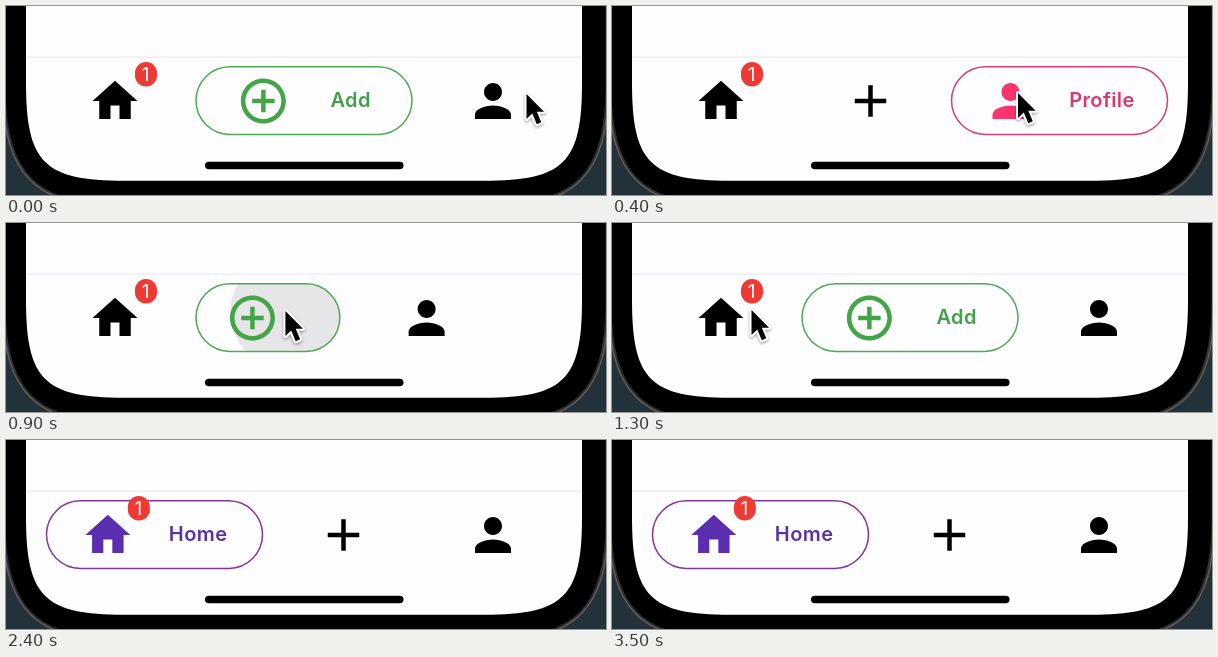
Animation of 600x189 px, one loop 3600 ms. Source, as an HTML page with a canvas:

```html
<!DOCTYPE html>
<html lang="en">
<head>
<meta charset="utf-8">
<title>Navigation bar</title>
<style>
  html, body { margin: 0; width: 100%; height: 100%; overflow: hidden; background: #000; }
  canvas { display: block; width: 600px; height: 189px; }
</style>
</head>
<body>
<canvas id="stage" width="600" height="189"></canvas>
<script>
const ctx = document.getElementById('stage').getContext('2d');
const LOOP = 3600, STEP = 100, SLIDE = 380;
const NARROW = 138, WIDE = 217, GAP = 11.5, LEFT = 40, ICON = 54;
const MID = 95;

const icons = {
  home: new Path2D('M10 20v-6h4v6h5v-8h3L12 3 2 12h3v8z'),
  plus: new Path2D('M19 13h-6v6h-2v-6H5v-2h6V5h2v6h6v2z'),
  ring: new Path2D('M13 7h-2v4H7v2h4v4h2v-4h4v-2h-4V7zm-1-5C6.48 2 2 6.48 2 12s4.48 10 10 10 10-4.48 10-10S17.52 2 12 2zm0 18c-4.41 0-8-3.59-8-8s3.59-8 8-8 8 3.59 8 8-3.59 8-8 8z'),
  person: new Path2D('M12 12c2.21 0 4-1.79 4-4s-1.79-4-4-4-4 1.79-4 4 1.79 4 4 4zm0 2c-2.67 0-8 1.34-8 4v2h16v-2c0-2.66-5.33-4-8-4z')
};
const arrow = new Path2D('M0 0V25L5.8 19.6L10.3 30.2L14.8 28.3L10.3 17.8H17.6Z');

// lag: how far a closing item's icon trails its centre
const items = [
  { label: 'Home', on: 'home', off: 'home', lag: 25, fill: '#5b2eb0', text: '#5932a3', edge: '#86369a' },
  { label: 'Add', on: 'ring', off: 'plus', lag: 24.4, fill: '#43a548', text: '#43a047', edge: '#4caa50' },
  { label: 'Profile', on: 'person', off: 'person', lag: 42, fill: '#fb346f', text: '#d8386f', edge: '#d43f78' }
];

const taps = [
  { at: 15, from: 1, to: 2 },
  { at: 794, from: 2, to: 1 },
  { at: 1730, from: 1, to: 0 }
];

// time, x, y of the pointer tip
const route = [
  [0, 520.5, 88], [100, 497, 88], [200, 480, 88], [400, 406, 87],
  [740, 281, 88], [940, 279, 88], [1300, 139.5, 87], [1750, 134, 86],
  [2050, 134, 86], [2300, 118, 200]
];

const clamp = v => Math.max(0, Math.min(1, v));
const mix = (a, b, k) => a + (b - a) * k;
const ease = x => x < 0.5 ? 4 * x ** 3 : 1 - 4 * (1 - x) ** 3;

function pointer(t) {
  const i = route.findIndex(p => p[0] > t);
  if (i < 0) return null;
  const [t0, x0, y0] = route[i - 1], [t1, x1, y1] = route[i];
  const k = (t - t0) / (t1 - t0);
  return { x: mix(x0, x1, k), y: mix(y0, y1, k) };
}

function box(x, y, w, h, r) {
  ctx.beginPath();
  ctx.roundRect(x, y, w, h, r);
}

// Open-topped body with smooth lower corners of size s; c sets their fullness
function body(l, r, b, s, c) {
  ctx.beginPath();
  ctx.moveTo(l, -20);
  ctx.lineTo(l, b - s);
  ctx.bezierCurveTo(l, b - c, l + c, b, l + s, b);
  ctx.lineTo(r - s, b);
  ctx.bezierCurveTo(r - c, b, r, b - c, r, b - s);
  ctx.lineTo(r, -20);
  ctx.closePath();
}

function drawPhone() {
  ctx.fillStyle = '#22323a';
  ctx.fillRect(0, 0, 600, 189);
  body(-3, 602, 201, 120, 32);
  ctx.fillStyle = '#000';
  ctx.fill();
  ctx.strokeStyle = '#2c2e31';
  ctx.lineWidth = 5;
  ctx.stroke();
  ctx.strokeStyle = '#5c5e62';
  ctx.lineWidth = 1.5;
  ctx.stroke();
  body(20, 576, 174.8, 98, 18);
  ctx.fillStyle = '#fefdff';
  ctx.fill();
  ctx.fillStyle = '#ededf0';
  ctx.fillRect(20, 50.5, 556, 1.3);
  box(199, 155.8, 198.5, 7.5, 3.75);
  ctx.fillStyle = '#000';
  ctx.fill();
}

function drawIcon(name, x, color) {
  ctx.save();
  ctx.translate(x - 27, MID - 27);
  ctx.scale(2.25, 2.25);
  ctx.fillStyle = color;
  ctx.fill(icons[name]);
  ctx.restore();
}

function drawBadge(x) {
  box(x - 11, 56, 22, 24.5, 11);
  ctx.fillStyle = '#ee3a32';
  ctx.fill();
  ctx.fillStyle = '#fff';
  ctx.font = '19px Inter, sans-serif';
  ctx.letterSpacing = '0px';
  ctx.textAlign = 'center';
  ctx.fillText('1', x - 0.5, 75);
}

function drawRipple(tap, age) {
  const alpha = 0.095 * clamp((330 - age) / 190);
  if (!alpha) return;
  const p = pointer(tap.at);
  ctx.save();
  ctx.clip();
  ctx.beginPath();
  ctx.arc(p.x, p.y + 1, Math.min(230, 0.005 * age * age), 0, 7);
  ctx.fillStyle = `rgba(0,0,0,${alpha})`;
  ctx.fill();
  ctx.restore();
}

function drawActive(item, x, w, e, k, tap, age) {
  ctx.font = '600 20px Inter, sans-serif';
  ctx.letterSpacing = '0.4px';
  const textW = ctx.measureText(item.label).width;
  const space = (w - ICON - textW * e * k) / 3;
  box(x + 0.5, 60.8, w - 1, 67.6, 33.8);
  drawRipple(tap, age);
  box(x + 0.5, 60.8, w - 1, 67.6, 33.8);
  ctx.strokeStyle = item.edge;
  ctx.lineWidth = 1.5;
  ctx.stroke();
  const cx = x + space + ICON / 2;
  drawIcon(item.on, cx, item.fill);
  ctx.globalAlpha = clamp(k * 2 - 1);
  ctx.fillStyle = item.text;
  ctx.textAlign = 'left';
  ctx.fillText(item.label, x + space * 2 + ICON - 0.8, 101.3);
  ctx.globalAlpha = 1;
  return cx;
}

function drawBar(t) {
  const tap = taps.findLast(p => p.at <= t) || { at: -1000, from: 2, to: 1 };
  const age = t - tap.at;
  const k = clamp(age / SLIDE), e = ease(k);
  let x = LEFT;
  items.forEach((item, i) => {
    let w = NARROW, cx;
    if (i === tap.to) {
      w = mix(NARROW, WIDE, e);
      cx = drawActive(item, x, w, e, k, tap, age);
    } else {
      const closing = i === tap.from;
      if (closing) w = mix(WIDE, NARROW, e);
      cx = x + w / 2 - (closing ? item.lag * (1 - k) : 0);
      drawIcon(item.off, cx, '#000');
    }
    if (i === 0) drawBadge(cx + 31);
    x += w + GAP;
  });
}

function drawPointer(t) {
  const p = pointer(t);
  if (!p) return;
  ctx.save();
  ctx.translate(p.x, p.y);
  ctx.lineJoin = 'round';
  ctx.lineWidth = 4;
  ctx.strokeStyle = '#fff';
  ctx.shadowColor = 'rgba(0,0,0,.35)';
  ctx.shadowBlur = 3;
  ctx.shadowOffsetY = 1.5;
  ctx.stroke(arrow);
  ctx.shadowColor = 'transparent';
  ctx.fillStyle = '#000';
  ctx.fill(arrow);
  ctx.restore();
}

const start = performance.now();
function frame() {
  const now = Math.max(0, performance.now() - start) % LOOP;
  const t = Math.floor(now / STEP) * STEP;
  drawPhone();
  drawBar(t);
  drawPointer(t);
  requestAnimationFrame(frame);
}
frame();
</script>
</body>
</html>
```
